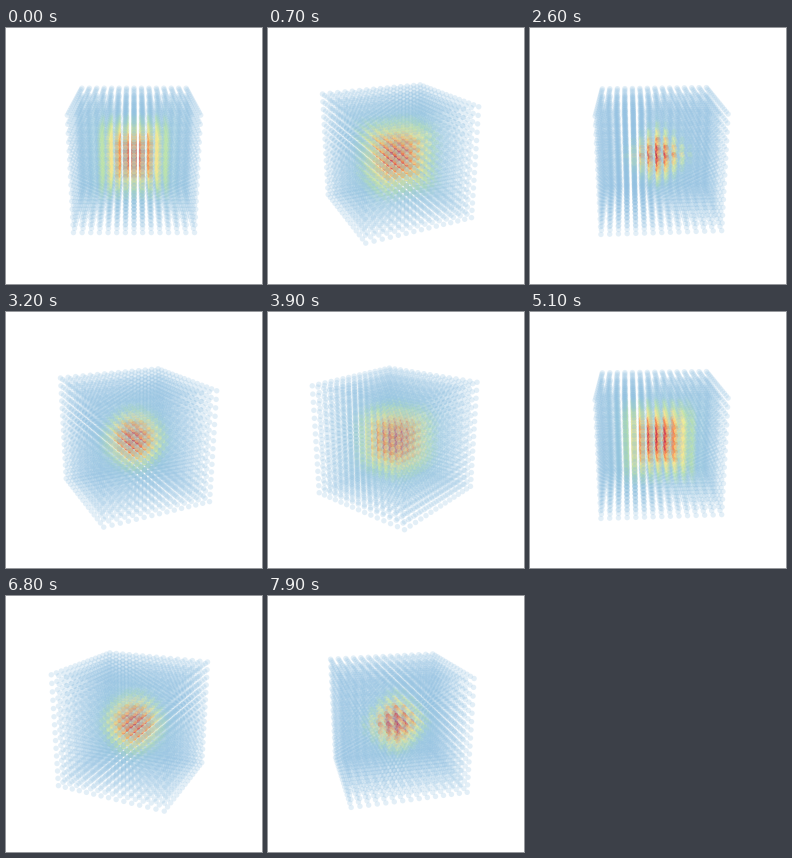
A matplotlib script that plays this animation: 256x256 px, repeating every 8000 ms.

```python
import numpy as np
import matplotlib.pyplot as plt
from matplotlib.animation import FuncAnimation
from matplotlib.colors import LinearSegmentedColormap

SIZE, FRAMES, STEP = 256, 80, 100
N = 15
ELEV = np.radians(20)
DIST, SCALE = 8.0, 56.0
CX, CY = 128, 127

cmap = LinearSegmentedColormap.from_list("heat", [
    (0.0, "#92c1e2"), (0.14, "#8fc5dc"), (0.24, "#abdda4"), (0.36, "#e6f598"),
    (0.5, "#fee08b"), (0.64, "#fdae61"), (0.76, "#f46d43"),
    (0.9, "#d53e4f"), (1.0, "#b3153f")])

axis = np.linspace(-1, 1, N)
X, Y, Z = (g.ravel() for g in np.meshgrid(axis, axis, axis))


def project(theta):
    """Turn the grid about the vertical axis; return screen x, y and depth."""
    right = X * np.cos(theta) + Y * np.sin(theta)
    front = Y * np.cos(theta) - X * np.sin(theta)
    up = Z * np.cos(ELEV) - front * np.sin(ELEV)
    near = front * np.cos(ELEV) + Z * np.sin(ELEV)
    zoom = SCALE * DIST / (DIST - near)
    return CX + right * zoom, CY - up * zoom, near


def field(i):
    """Bell-shaped value whose level sets morph between box and octahedron."""
    k = 0.5 + 0.5 * np.cos(2 * np.pi * i / 50)
    p = 1.3 * 6 ** k
    d = (abs(X) ** p + abs(Y) ** p + abs(Z) ** p) ** (1 / p)
    return np.exp(-d ** 2 / 0.25)


fig = plt.figure(figsize=(SIZE / 100, SIZE / 100), dpi=100, facecolor="white")
ax = fig.add_axes([0, 0, 1, 1])
ax.set(xlim=(0, SIZE), ylim=(SIZE, 0))
ax.axis("off")
dots = ax.scatter(X, Y, s=(5.4 * 0.72) ** 2, linewidths=0)


def update(i):
    x, y, near = project(np.radians(3.6 * i))
    order = np.argsort(near, kind="stable")
    v = field(i)
    rgba = cmap(v)
    rgba[:, 3] = 0.25 + 0.5 * np.clip((v - 0.15) / 0.5, 0, 1)
    dots.set_offsets(np.column_stack([x, y])[order])
    dots.set_facecolors(rgba[order])
    return dots,


anim = FuncAnimation(fig, update, frames=FRAMES, interval=STEP,
                     init_func=lambda: update(0), repeat=True, repeat_delay=0)
plt.show()
```
